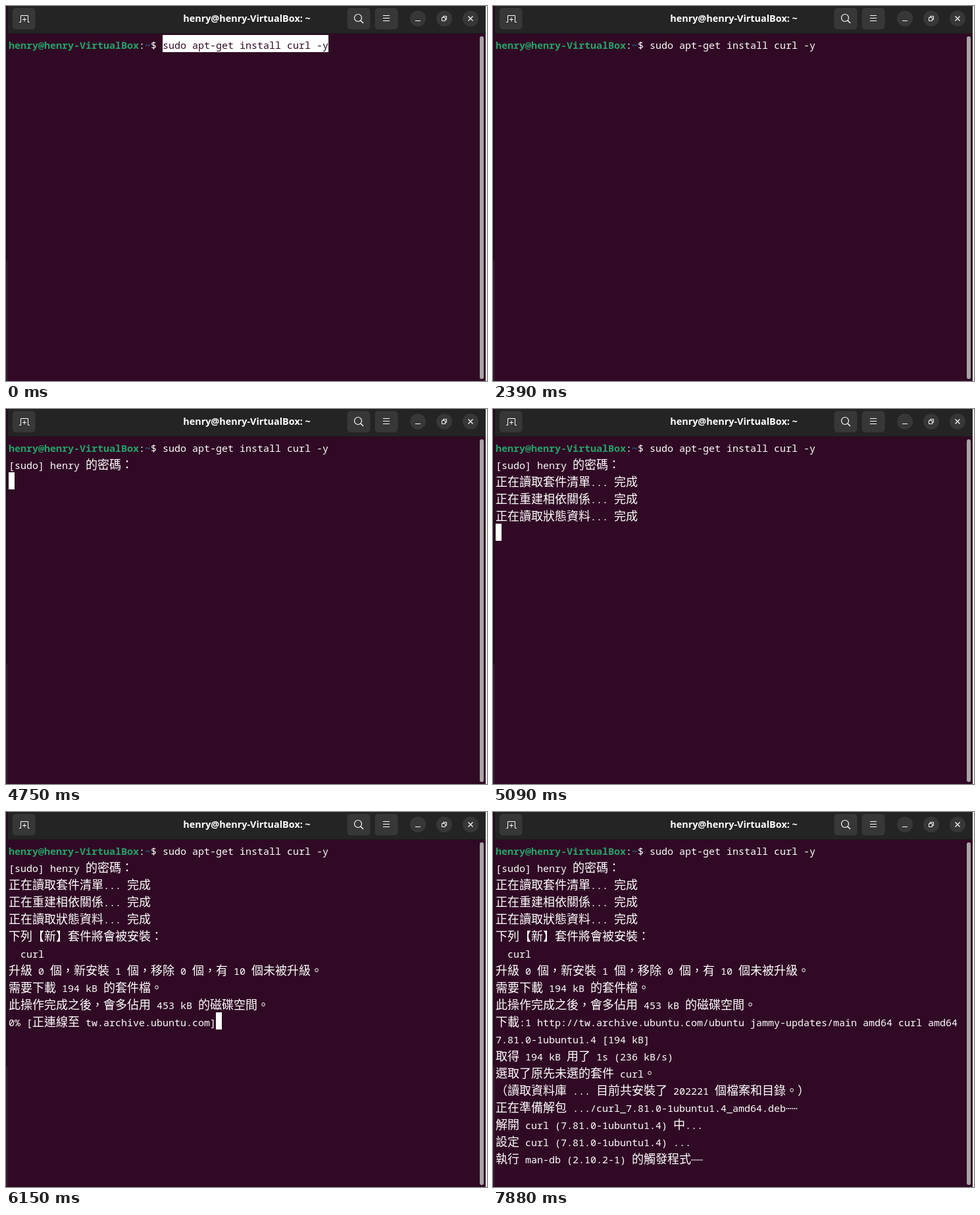
Write an HTML page that moves like this. It is 731x569 px and loops after 8000 ms.

```html
<!DOCTYPE html>
<html lang="zh-TW">
<head>
<meta charset="utf-8">
<title>Terminal</title>
<style>
  html, body { margin: 0; width: 100%; height: 100%; overflow: hidden; background: #fff; }
  svg { display: block; width: 731px; height: 569px; }
  text { white-space: pre; text-spacing-trim: space-all; fill: #fff; }
  .mono { font: 15px "Noto Sans Mono", "DejaVu Sans Mono", monospace; }
  .cjk { font: 18px "Noto Sans CJK TC", "Noto Sans CJK", sans-serif; }
  .title { font: bold 14.4px "Open Sans", "Noto Sans", sans-serif; text-anchor: middle; }
  .user { font-weight: bold; fill: #26a269; }
  .path { font-weight: bold; fill: #1d6585; }
  .picked { fill: #300a24; }
  .btn { fill: #373737; }
  .icon { fill: none; stroke: #fff; }
</style>
</head>
<body>
<svg viewBox="0 0 731 569">
  <rect width="729" height="569" fill="#300a24"/>
  <rect width="729" height="42" fill="#242424"/>
  <rect y="41" width="729" height="1" fill="#1c1c1c"/>
  <rect width="3" height="386" fill="#240d1e"/>
  <rect y="386" width="3" height="183" fill="#32192b"/>

  <g class="btn">
    <rect x="10" y="3" width="34.500" height="32.500" rx="5"/>
    <rect x="518.500" y="3" width="35" height="32.500" rx="5"/>
    <rect x="560.500" y="3" width="35" height="32.500" rx="5"/>
    <circle cx="626" cy="19" r="12"/>
    <circle cx="666" cy="19" r="12"/>
    <circle cx="706" cy="19" r="12"/>
  </g>
  <g class="icon">
    <path d="M20 24.500h2.500v-10h11v10h2.500M25 20.500h6M28 17.500v6"/>
    <path d="M539 22l4 4" stroke-width="1.400"/>
    <circle cx="535" cy="18" r="5.500" stroke-width="1.200"/>
    <path d="M573 14.500h10M573 18.500h10M573 22.500h10"/>
    <path d="M622 22.500h8"/>
    <path d="M662.500 17.500h5v5h-5zM664.500 17v-1.500h5v5h-1.500"/>
    <path d="M702.500 15.500l7 7M709.500 15.500l-7 7" stroke-width="1.300"/>
  </g>
  <text class="title" x="366" y="24">henry@henry-VirtualBox: ~</text>
  <rect x="720" y="46" width="6" height="520" rx="3" fill="#a8a3a6"/>

  <rect id="pick" x="238" y="44" width="252" height="26" fill="#fff"/>
  <g id="screen"></g>
  <rect id="caret" width="9" height="26" fill="#fff"/>
  <g id="beam" fill="none">
    <path d="M-3-7H3M0-7V7M-3 7H3" stroke="#fff" stroke-width="3" stroke-linecap="square"/>
    <path d="M-3-7H3M0-7V7M-3 7H3" stroke="#111"/>
  </g>
</svg>
<script>
const LOOP = 8000, CELL = 9, ROW = 26, LEFT = 4, TOP = 44;
const $ = id => document.getElementById(id);
const NS = 'http://www.w3.org/2000/svg';
const wide = /[\u3000-\u9fff\uff00-\uffef]/;
const colX = col => LEFT + col * CELL;
const rowY = row => TOP + row * ROW;
const show = (el, on) => el.setAttribute('visibility', on ? 'visible' : 'hidden');

function make(tag, parent, attrs = {}) {
  const el = parent.appendChild(document.createElementNS(NS, tag));
  for (const k in attrs) el.setAttribute(k, attrs[k]);
  return el;
}

// Lays text on the cell grid; wide glyphs take two cells.
function print(parent, row, text, col = 0, cls = '') {
  for (const run of text.split(/([\u3000-\u9fff\uff00-\uffef]+|…+)/)) {
    if (!run) continue;
    const cjk = wide.test(run);
    const lift = run[0] === '…' ? 4 : 0;
    make('text', parent, {
      x: colX(col), y: rowY(row) + 21 - lift,
      class: (cjk ? 'cjk ' : 'mono ') + cls
    }).textContent = run;
    col += run.length * (cjk ? 2 : 1);
  }
}

const screen = $('screen');
print(screen, 0, 'henry@henry-VirtualBox', 0, 'user');
print(screen, 0, ':', 22);
print(screen, 0, '~', 23, 'path');
print(screen, 0, '$', 24);

// [row, from, to, text]
const output = [
  [1, 2460, LOOP, '[sudo] henry 的密碼：'],
  [2, 4820, 4890, '正在讀取套件清單... 0%'],
  [2, 4890, LOOP, '正在讀取套件清單... 完成'],
  [3, 4890, 5090, '正在重建相依關係... 50%'],
  [3, 5090, LOOP, '正在重建相依關係... 完成'],
  [4, 5090, LOOP, '正在讀取狀態資料... 完成'],
  [5, 5290, LOOP, '下列【新】套件將會被安裝：'],
  [6, 5290, LOOP, '  curl'],
  [7, 5390, LOOP, '升級 0 個，新安裝 1 個，移除 0 個，有 10 個未被升級。'],
  [8, 5390, LOOP, '需要下載 194 kB 的套件檔。'],
  [9, 5390, LOOP, '此操作完成之後，會多佔用 453 kB 的磁碟空間。'],
  [10, 5490, 6020, '0% [執行中]'],
  [10, 6020, 6280, '0% [正連線至 tw.archive.ubuntu.com]'],
  [10, 6280, LOOP, '下載:1 http://tw.archive.ubuntu.com/ubuntu jammy-updates/main amd64 curl amd64'],
  [11, 6280, LOOP, '7.81.0-1ubuntu1.4 [194 kB]'],
  [12, 6280, LOOP, '取得 194 kB 用了 1s (236 kB/s)'],
  [13, 7080, LOOP, '選取了原先未選的套件 curl。'],
  [14, 7080, 7150, '（讀取資料庫 ...'],
  [14, 7150, 7230, '（讀取資料庫 ... 15%'],
  [14, 7230, 7310, '（讀取資料庫 ... 55%'],
  [14, 7310, LOOP, '（讀取資料庫 ... 目前共安裝了 202221 個檔案和目錄。）'],
  [15, 7310, LOOP, '正在準備解包 .../curl_7.81.0-1ubuntu1.4_amd64.deb……'],
  [16, 7400, LOOP, '解開 curl (7.81.0-1ubuntu1.4) 中...'],
  [17, 7640, LOOP, '設定 curl (7.81.0-1ubuntu1.4) ...'],
  [18, 7880, LOOP, '執行 man-db (2.10.2-1) 的觸發程式……']
];
const command = 'sudo apt-get install curl -y', PICK_END = 2390;
const parts = [];
function timed(row, from, to, text, col, cls) {
  const el = make('g', screen);
  print(el, row, text, col, cls);
  parts.push({ el, from, to });
}
timed(0, 0, PICK_END, command, 26, 'picked');
timed(0, PICK_END, LOOP, command, 26);
output.forEach(line => timed(...line));

// [from, to, column, row] while the block caret is lit
const carets = [
  [310, 930, 54, 0], [1660, 2190, 54, 0],
  [2460, 2990, 22, 1], [3620, 4750, 22, 1],
  [4750, 4820, 0, 2], [4820, 4890, 22, 2],
  [4890, 5090, 23, 3], [5090, 5290, 0, 5],
  [6150, 6280, 35, 10], [6280, 6550, 0, 13]
];

// Pointer enters from the lower right in eight hops, slowing down.
function beamAt(t) {
  if (t >= 1660) return [605.5, 299.5];
  const hop = Math.min(8, Math.floor((t - 310) / 77.5)) / 8;
  const left = (1 - hop) ** 2;
  return [613.5 + 91 * left, 303.5 + 262 * left];
}

function draw(t) {
  for (const p of parts) show(p.el, t >= p.from && t < p.to);
  show($('pick'), t < PICK_END);

  const c = carets.find(([from, to]) => t >= from && t < to);
  show($('caret'), c);
  if (c) {
    $('caret').setAttribute('x', colX(c[2]));
    $('caret').setAttribute('y', rowY(c[3]));
  }

  const pointing = t >= 310 && t < PICK_END;
  show($('beam'), pointing);
  if (pointing) $('beam').setAttribute('transform', `translate(${beamAt(t)})`);
}

const start = performance.now();
function tick() {
  draw((performance.now() - start) % LOOP);
  requestAnimationFrame(tick);
}
tick();
</script>
</body>
</html>
```
